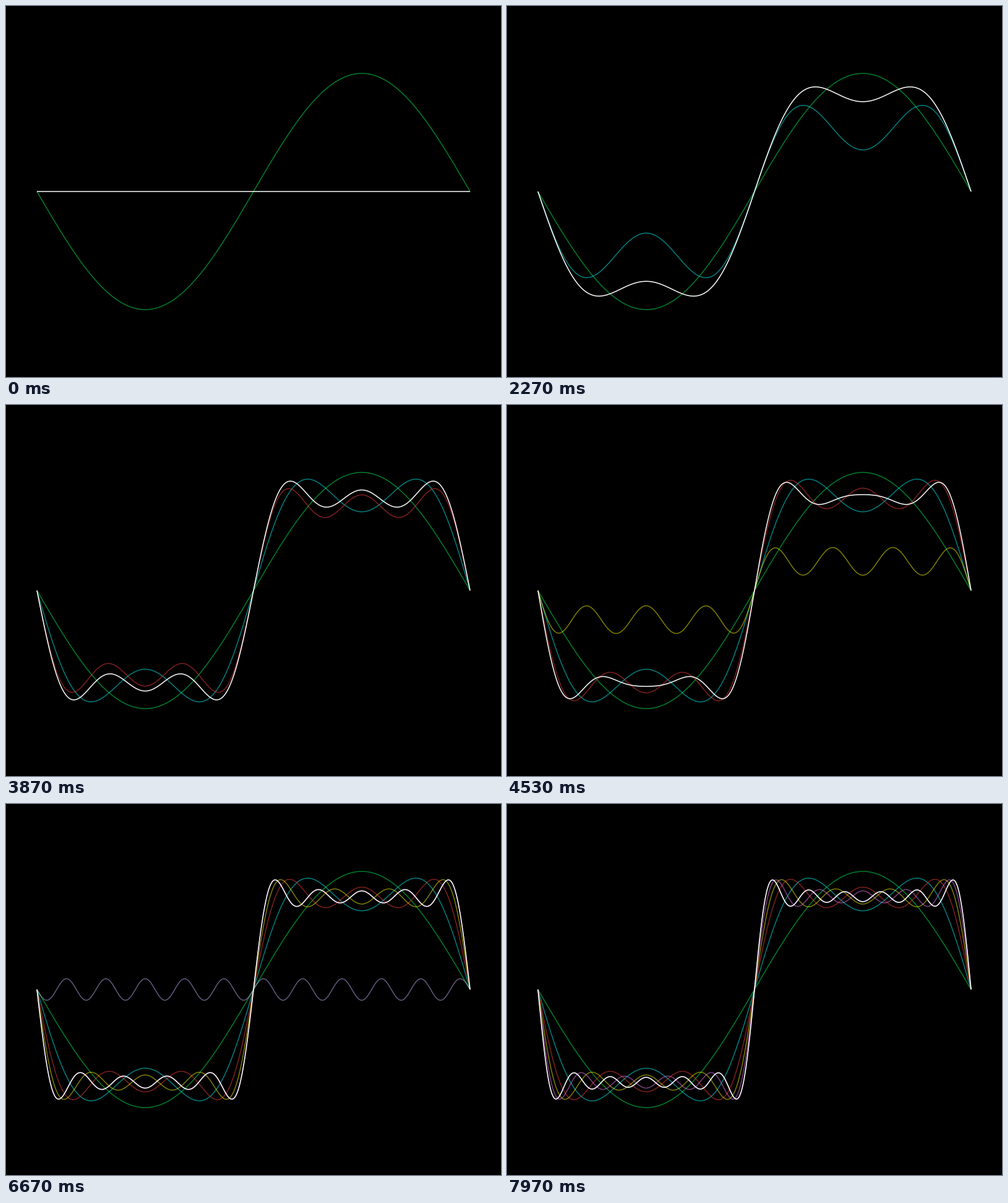
Write a matplotlib script that moves like this. It is 800 px wide and 600 px high and loops after 8 s.

```python
import numpy as np
import matplotlib.pyplot as plt
from matplotlib.animation import FuncAnimation

W, H, DPI = 800, 600, 100
FRAMES, DURATION = 240, 8000
STEPS = 40            # frames spent adding each harmonic
HOLD = 4              # frames a new harmonic rests before it rises
AMP = 150 * 4 / np.pi
COLORS = [
    (0, 1, 0.35),
    (0, 1, 1),
    (1, 0.25, 0.25),
    (1, 1, 0),
    (1, 0.5, 1),
    (0.78, 0.72, 1),
]

plt.rcParams["path.simplify"] = False

theta = np.linspace(-np.pi, np.pi, 1401)
xs = W / 2 + 350 * theta / np.pi
harmonics = [AMP * np.sin(k * theta) / k for k in range(1, 2 * len(COLORS), 2)]
sums = [np.zeros_like(theta)]
for wave in harmonics:
    sums.append(sums[-1] + wave)

fig = plt.figure(figsize=(W / DPI, H / DPI), dpi=DPI, facecolor="black")
ax = fig.add_axes([0, 0, 1, 1])
ax.set_xlim(0, W)
ax.set_ylim(0, H)
ax.axis("off")


def make_line(color, alpha, z):
    line, = ax.plot([], [], color=color, alpha=alpha, lw=1.5 * 72 / DPI,
                    solid_capstyle="butt", zorder=z, snap=False)
    return line


parts = [make_line(c, 0.5, i + 1) for i, c in enumerate(COLORS)]
total = make_line("white", 1, 10)


def draw(frame):
    n, k = divmod(frame, STEPS)
    grow = k / (STEPS - 1)
    rise = max(0, (k - HOLD) / (STEPS - 1 - HOLD))
    for i, line in enumerate(parts):
        line.set_visible(i <= n)
        lift = 1 if i < n else rise
        line.set_data(xs, H / 2 + harmonics[i] + lift * sums[i])
    total.set_data(xs, H / 2 + sums[n] + grow * harmonics[n])
    return parts + [total]


anim = FuncAnimation(fig, draw, frames=FRAMES, init_func=lambda: draw(0),
                     interval=DURATION / FRAMES, repeat=True, repeat_delay=0)
plt.show()
```
